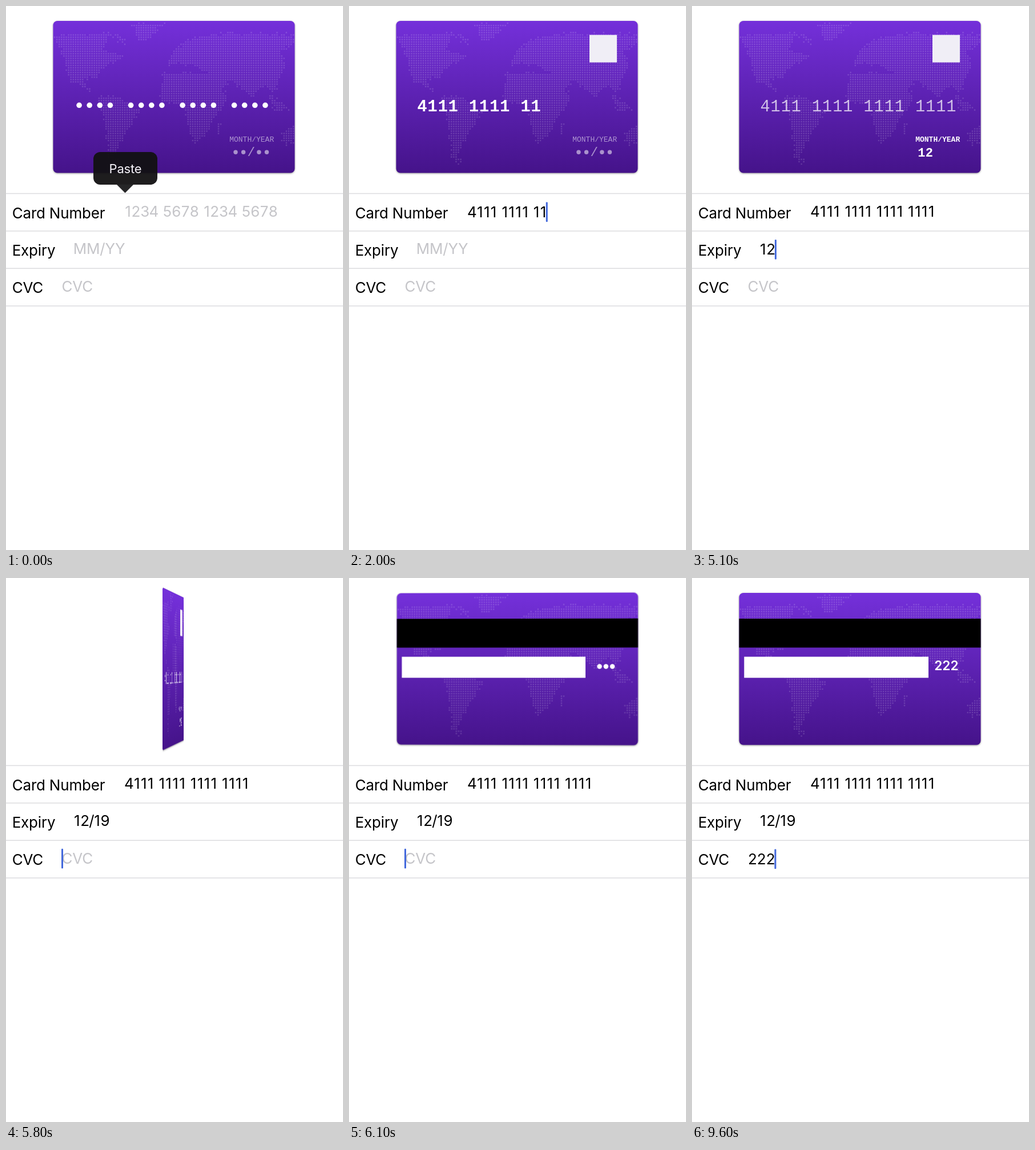
Animation, 590 px wide and 950 px high, one loop 9.8 s. Source, as an HTML page:

```html
<!DOCTYPE html>
<html lang="en">
<head>
<meta charset="utf-8">
<title>Card form</title>
<style>
  html, body { margin: 0; width: 100%; height: 100%; overflow: hidden; background: #fff; }
  svg { position: absolute; left: 0; top: 0; width: 590px; height: 950px; }
  #card { transform-origin: 294px 158.75px; }
  #form { font: 26px Inter, sans-serif; letter-spacing: -0.2px; }
  .mono { font-family: "Liberation Mono", monospace; fill: #fff; white-space: pre; }
  .plate { filter: drop-shadow(0 1.5px 1.5px rgba(0, 0, 0, .4)); }
</style>
</head>
<body>
<svg id="card" viewBox="0 0 590 950">
  <defs>
    <linearGradient id="violet" x1="0" y1="0" x2="0" y2="1">
      <stop offset="0" stop-color="#7430da"/>
      <stop offset="1" stop-color="#45138a"/>
    </linearGradient>
  </defs>
  <rect class="plate" x="82.5" y="26" width="423" height="265.5" rx="7.5" fill="url(#violet)"/>
  <path id="map" fill="none" stroke="#fff" stroke-opacity=".15" stroke-width="2.7" stroke-linecap="round"/>
  <g id="front">
    <rect id="badge" x="421" y="50.5" width="48" height="48" fill="#f0eef6"/>
    <g id="number"></g>
    <g id="expiry"></g>
  </g>
  <g id="back">
    <rect x="82.5" y="71" width="423" height="50.5"/>
    <rect x="91.3" y="137.5" width="322.7" height="36.8" fill="#fff"/>
    <g id="code" fill="#fff" font-family="Inter, sans-serif" font-size="22.6" font-weight="600" text-anchor="end"></g>
  </g>
</svg>
<svg id="form" viewBox="0 0 590 950">
  <g id="rows"></g>
  <g id="fields"></g>
  <rect id="caret" width="3" height="34.5" rx="1" fill="#4268dc"/>
  <g id="popup">
    <rect x="153" y="255" width="112" height="57" rx="12" fill="#121113"/>
    <path d="M193.5 311.5h30L208.5 326.5Z" fill="#1b1b1c"/>
    <text x="209" y="292" font-size="22" fill="#fff" text-anchor="middle">Paste</text>
  </g>
</svg>
<script>
const LOOP = 9800, STEP = 100, ROW = 65.4;
const $ = id => document.getElementById(id);
const each = (n, draw) => Array.from({ length: n }, (_, i) => draw(i)).join('');

// Dotted world map: grid points inside rough outlines, with a ragged coast
const pen = document.createElement('canvas').getContext('2d');
let seed = 7, dots = '';
const ragged = () => ((seed = seed * 16807 % 2147483647) / 2147483647 - .5) * 6;
function land(outline) {
  const shape = new Path2D(`M${outline}Z`);
  for (let y = 30; y < 286; y += 4.1)
    for (let x = 85; x < 505; x += 4.1)
      if (pen.isPointInPath(shape, x + ragged(), y + ragged())) dots += `M${x.toFixed(1)} ${y.toFixed(1)}h.01`;
}
land('84 50 178 48 170 76 206 88 164 114 160 127 129 126 156 156 112 128 98 84'); // North America
land('222 30 280 30 236 68');                                                    // Greenland
land('174 42 212 56 206 68');                                                    // Arctic islands
land('158 158 196 156 234 184 192 254 196 278 179 262 175 212');                 // South America
land('275 117 358 118 390 158 350 222 330 244 317 200 308 171 268 166');         // Africa
land('281 105 292 80 318 58 380 48 505 49 505 68 480 78 490 98 470 152 450 138 430 160 394 128 374 152 352 114 306 98');
land('460 150 496 180 470 186');                                                 // East Indies
land('483 220 505 206 505 240 484 241');                                         // Australia
land('369 206 379 199 372 224');                                                 // Madagascar
$('map').setAttribute('d', dots);

// Each field is typed at an even pace from its start time
const FIELDS = [
  { label: 'Card Number', x: 207.5, hint: '1234 5678 1234 5678', focus: 0,
    keys: '4' + '1'.repeat(15), start: 40, gap: 216, format: s => s.replace(/(.{4})(?=.)/g, '$1 ') },
  { label: 'Expiry', x: 118.2, hint: 'MM/YY', focus: 3500,
    keys: '1219', start: 4500, gap: 310, format: s => s.replace(/(..)(?=.)/, '$1/') },
  { label: 'CVC', x: 98, hint: 'CVC', focus: 5450,
    keys: '222', start: 7700, gap: 620, format: s => s }
];
const CARD_EXPIRY = 3300, FLIP = 5461, FLIP_TIME = 703;

const advance = c => c === '1' ? 11.9 : /\d/.test(c) ? 15.8 : 7.7;
const width = s => [...s].reduce((sum, c) => sum + advance(c), 0);
const show = (id, on) => { $(id).style.display = on ? '' : 'none'; };
const circle = (x, y, r) => `<circle cx="${x}" cy="${y}" r="${r}" fill="#fff"/>`;
const mono = (x, y, size, bold, s, gap = 0) =>
  `<text class="mono" x="${x}" y="${y}" font-size="${size}" letter-spacing="${gap}" font-weight="${bold ? 700 : 400}">${s}</text>`;
const rule = i => `<path d="M0 ${327.5 + ROW * i}H590" stroke="#dcdcdf" stroke-width="1.5"/>`;

$('rows').innerHTML = each(4, rule) +
  each(3, i => `<text x="10.7" y="${370.5 + ROW * i}">${FIELDS[i].label}</text>`);

const pressed = (f, t) =>
  t < STEP ? 0 : Math.min(f.keys.length, Math.max(0, Math.floor((t - f.start) / f.gap) + 1));

function fieldText(i, value, active) {
  const { x, hint } = FIELDS[i], s = value || hint;
  const y = 368 + ROW * i + (active && value ? 1 : 0);
  const paint = `y="${y}" fill="${value ? '#000' : '#c5c5c9'}"`;
  if (/[A-Z]/.test(s)) return `<text x="${x - .5}" ${paint}>${s}</text>`;
  const mids = [...s].map((c, k) => x + width(s.slice(0, k)) + advance(c) / 2);
  return `<text text-anchor="middle" x="${mids.join(' ')}" ${paint}>${s}</text>`;
}

function drawNumber(value, active) {
  $('number').innerHTML = value
    ? mono(119.5, 183.8, 28.6, active, value, .94)
    : each(16, i => circle(128.1 + 18.1 * (i + Math.floor(i / 4)), 173.3, 4.8));
  $('number').setAttribute('opacity', active ? 1 : .72);
}

function drawExpiry(value, active) {
  const pair = x => circle(x, 255.2, 3.7) + circle(x + 13.6, 255.2, 3.7);
  const date = value
    ? mono(395.2, 263, 22, active, value, .4)
    : pair(402) + mono(422.4, 262, 22.6, active, '/') + pair(442.9);
  $('expiry').innerHTML = mono(391.2, 236.5, 13, active, 'MONTH/YEAR') + date;
  $('expiry').setAttribute('opacity', active ? 1 : .53);
}

function drawCode(value) {
  $('code').innerHTML = value
    ? `<text x="466.5" y="161">${value}</text>`
    : each(3, i => circle(438.5 + 11.2 * i, 154.5, 4.2));
}

// The blink restarts with every key press
function drawCaret(i, count, value, t) {
  const f = FIELDS[i];
  const last = count ? f.start + f.gap * (count - 1) : f.focus;
  show('caret', t >= STEP && (t - last) % 1000 < 700);
  $('caret').setAttribute('x', f.x + width(value) - 1);
  $('caret').setAttribute('y', 342 + ROW * i + (value ? .6 : 0));
}

function turn(t) {
  const u = Math.min(1, Math.max(0, (t - FLIP) / FLIP_TIME));
  const angle = 90 * (1 - Math.cos(Math.PI * u));
  const isFront = angle < 90;
  show('front', isFront);
  show('back', !isFront);
  $('card').style.transform = u > 0 && u < 1
    ? `perspective(3150px) rotateY(${isFront ? angle : angle - 180}deg)` : 'none';
}

function render(t) {
  const counts = FIELDS.map(f => pressed(f, t));
  const values = FIELDS.map((f, i) => f.format(f.keys.slice(0, counts[i])));
  const active = FIELDS.filter(f => t >= f.focus).length - 1;
  $('fields').innerHTML = each(3, i => fieldText(i, values[i], i === active));
  drawCaret(active, counts[active], values[active], t);
  drawNumber(values[0], t < CARD_EXPIRY);
  drawExpiry(values[1], t >= CARD_EXPIRY && active < 2);
  drawCode(values[2]);
  show('badge', values[0]);
  show('popup', t < 300);
  $('popup').setAttribute('opacity', .95 * Math.max(0, 1 - t / 300));
  turn(t);
}

const begin = performance.now();
let shown = -1;
function tick() {
  const t = Math.floor((performance.now() - begin) % LOOP / STEP) * STEP;
  if (t !== shown) render(shown = t);
  requestAnimationFrame(tick);
}
tick();
</script>
</body>
</html>
```
